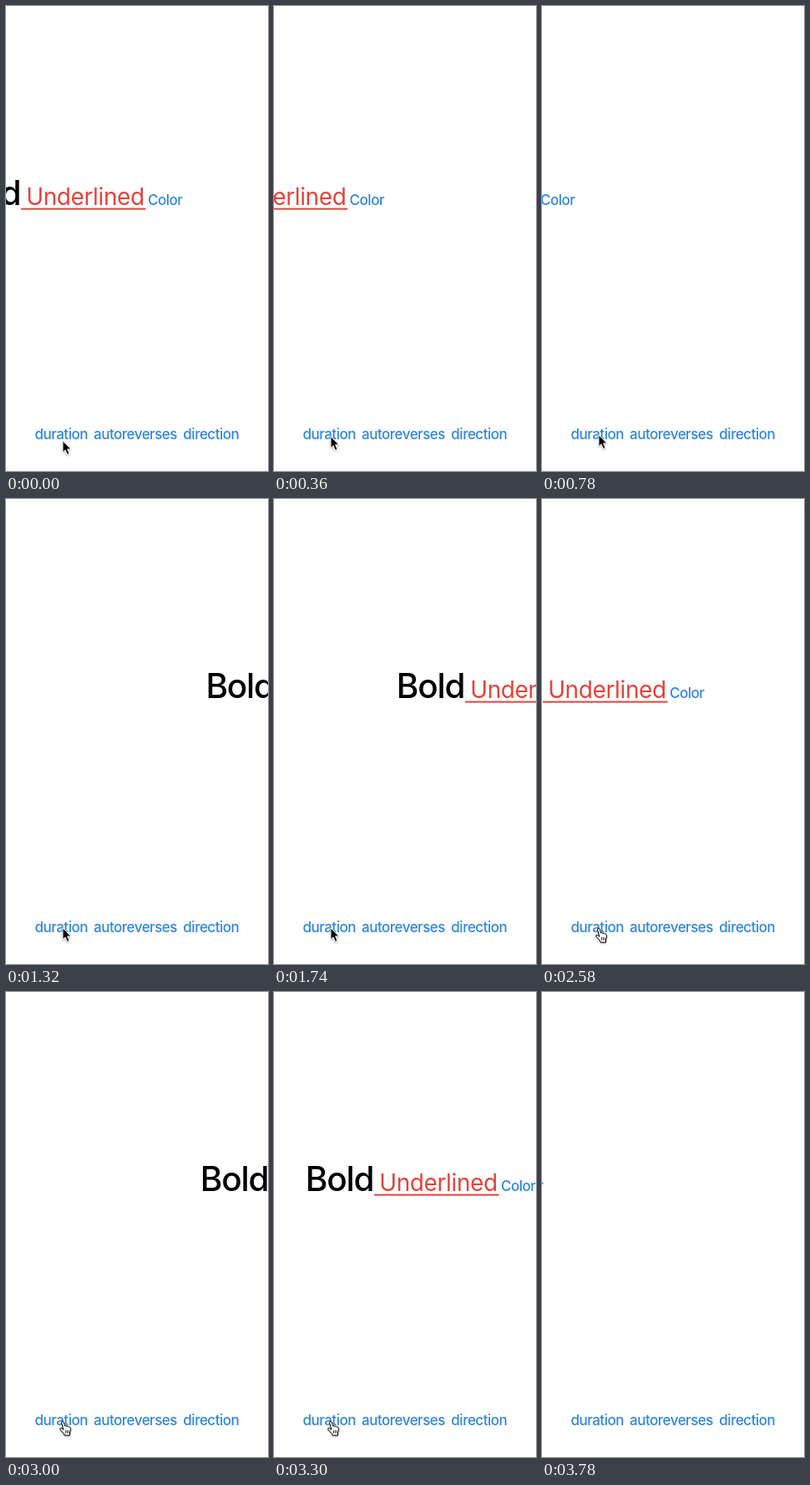
Recreate the animation shown at these times as an HTML page. Size 314x556 px, loop 3.84 s.

```html
<!DOCTYPE html>
<html lang="en">
<head>
<meta charset="utf-8">
<title>Marquee</title>
<style>
  html, body { margin: 0; width: 100%; height: 100%; overflow: hidden; background: #fff; }
  svg { display: block; }
  text { font: 450 17px Inter, sans-serif; font-optical-sizing: none; letter-spacing: -.5px; white-space: pre; }
  .blue { fill: #2f86de; }
  .red { fill: #e4433a; }
  #bold { font-size: 40.5px; letter-spacing: -1.2px; }
  #underlined { font-size: 28px; font-weight: 400; letter-spacing: -.38px; }
  #buttons { text-anchor: middle; }
  #cursor { filter: drop-shadow(0 1px 1px #0005); stroke-linejoin: round; }
</style>
</head>
<body>
<svg width="314" height="556" viewBox="0 0 314 556">
  <g id="track">
    <text id="bold" x="-3.2" y="238.3">Bold</text>
    <text id="underlined" class="red" x="85.2" y="238.3">Underlined</text>
    <rect class="red" x="79" y="241.6" width="149.5" height="2"/>
    <text class="blue" x="231" y="238.3">Color</text>
  </g>
  <g id="buttons" class="blue">
    <text id="duration" x="66.2" y="518.2">duration</text>
    <text x="155" y="518.2">autoreverses</text>
    <text x="245.8" y="518.2">direction</text>
  </g>
  <g id="cursor">
    <path id="arrow" stroke="#fff" d="M68 512.7v14l3.1-2.8 2.3 5.5 2.6-1.1-2.3-5.4h4.2z"/>
    <g id="hand" transform="translate(64 512.6)" fill="#fff" stroke="#000">
      <path d="M4.6 9.5 2.6 2.6Q2.4.8 3.8.8 5 .8 5.4 2.2L6.6 6.4Q8 5.4 9 6.8 10.4 6 11.3 7.4 13 7 13.3 8.8 14 12 12.6 14.5L12.4 17.5H6.2L5.6 15.5Q3 13.4.8 10.4.2 8.8 1.8 8.8 3 9 4.6 10.8z"/>
      <path stroke-width=".8" d="M7.5 11.5v3.5M9.4 11.5v3.5M11.3 11.5v3.5"/>
    </g>
  </g>
</svg>
<script>
const LOOP = 3840, STEP = 60;
const CLICK = 1960;

// Each pass runs right to left: x at a known time, speed in px per ms.
const passes = [
  { from: 0, at: 0, x: -61, speed: .2205 },
  { from: 975, at: 1740, x: 150, speed: .2205 },
  { from: CLICK, at: 2160, x: 189.5, speed: .637 },
  { from: 2880, at: 3300, x: 41, speed: .65 }
];

const $ = id => document.getElementById(id);
const progress = (t, a, b) => Math.min(1, Math.max(0, (t - a) / (b - a)));
const smooth = p => p * p * (3 - 2 * p);
const show = (id, on) => $(id).setAttribute("visibility", on ? "visible" : "hidden");
const move = (id, x, y) => $(id).setAttribute("transform", `translate(${x} ${y})`);

function draw(t) {
  const pass = passes.findLast(p => t >= p.from);
  move("track", pass.x - pass.speed * (t - pass.at), 0);

  // The button dims while pressed and fades back after release.
  const pressed = t >= 1860;
  $("duration").setAttribute("opacity", pressed ? .2 + .8 * progress(t, CLICK, 2225) : 1);

  const arrive = smooth(progress(t, 0, 540));
  const leave = progress(t, 3480, 3780) ** 2;
  const y = 7 * (1 - arrive) + 50 * leave;
  const pointing = t >= 1800 && y < 12;
  move("cursor", 0, y);
  show("hand", pointing);
  show("arrow", !pointing);
}

const start = performance.now();
function tick() {
  const t = (performance.now() - start) % LOOP;
  draw(Math.floor(t / STEP) * STEP);
  requestAnimationFrame(tick);
}
tick();
</script>
</body>
</html>
```
